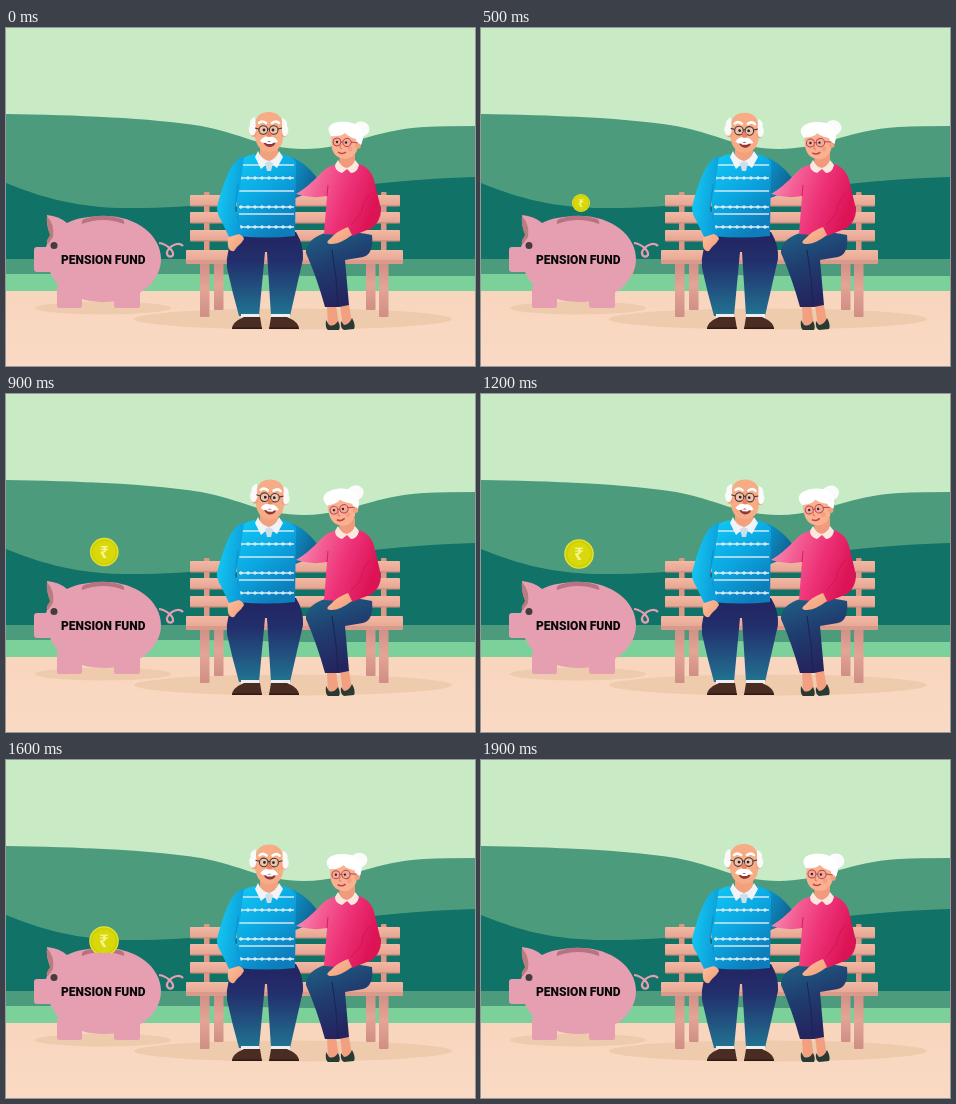
These frames come from a looping animation (469 by 338 pixels, 2 s). An HTML page:

```html
<!DOCTYPE html>
<html lang="en">
<head>
<meta charset="utf-8">
<title>Pension fund</title>
<style>
html, body { margin: 0; width: 100%; height: 100%; overflow: hidden; background: #c8ebc6; }
svg { display: block; width: 100vw; height: 100vh; }
</style>
</head>
<body>
<svg viewBox="0 0 469 338" preserveAspectRatio="none">
  <defs>
    <linearGradient id="ground" x2="0" y2="1"><stop stop-color="#f8d5bd"/><stop offset="1" stop-color="#fadac4"/></linearGradient>
    <linearGradient id="wood" x2="0" y2="1"><stop stop-color="#f2b9a3"/><stop offset="1" stop-color="#e5a492"/></linearGradient>
    <linearGradient id="leg" x2="0" y2="1"><stop stop-color="#cf8c84"/><stop offset=".5" stop-color="#e3a596"/><stop offset="1" stop-color="#d08e85"/></linearGradient>
    <linearGradient id="blue" x2=".6" y2="1"><stop stop-color="#10caf6"/><stop offset=".5" stop-color="#0ba9e3"/><stop offset="1" stop-color="#0d7dbb"/></linearGradient>
    <linearGradient id="sleeve" x2="1" y2=".4"><stop stop-color="#16d0f8"/><stop offset="1" stop-color="#0c9cd8"/></linearGradient>
    <linearGradient id="backArm" x2="1" y2=".6"><stop stop-color="#0aa2df"/><stop offset="1" stop-color="#125f8c"/></linearGradient>
    <linearGradient id="denim" x2="0" y2="1"><stop stop-color="#232460"/><stop offset=".35" stop-color="#222f6c"/><stop offset="1" stop-color="#217492"/></linearGradient>
    <linearGradient id="slacks" x2=".3" y2="1"><stop stop-color="#1e6285"/><stop offset=".5" stop-color="#203d70"/><stop offset="1" stop-color="#24245f"/></linearGradient>
    <linearGradient id="pink" x2="1" y2=".3"><stop stop-color="#f79abb"/><stop offset=".35" stop-color="#f35c93"/><stop offset=".65" stop-color="#ee3278"/><stop offset="1" stop-color="#dc1456"/></linearGradient>
    <linearGradient id="skin" x2="1" y2="1"><stop stop-color="#fbc09c"/><stop offset="1" stop-color="#f39c7a"/></linearGradient>
    <clipPath id="aboveSlot"><path d="M60 130H140V197H118Q97 188 76 197H60Z"/></clipPath>
    <clipPath id="sweaterClip"><path d="M233 129H288V209H233Z"/></clipPath>
  </defs>

  <!-- landscape -->
  <path fill="#c8ebc6" d="M0 0H469V338H0Z"/>
  <path fill="#4d9b7d" d="M0 86C70 87 145 90 195 98C234 105 258 121 298 121C342 121 366 102 418 99Q440 98 469 98V250H0Z"/>
  <path fill="#117267" d="M0 155C30 167 65 179 115 180C185 181 240 172 300 165Q390 151 469 149V231H0Z"/>
  <path fill="#4d9b7d" d="M0 231H469V250H0Z"/>
  <path fill="#7cd19b" d="M0 246H200L300 248H469V264H0Z"/>
  <path fill="url(#ground)" d="M0 263H469V338H0Z"/>
  <g fill="#eecbad">
    <ellipse cx="97" cy="280" rx="68" ry="6.5"/>
    <ellipse cx="287" cy="291" rx="159" ry="10.5"/>
  </g>

  <!-- piggy bank -->
  <g fill="#e69fb1">
    <path d="M153 215C161 216 168 223 167 227C164 231 159 227 162 222C166 216 174 214 177 218" fill="none" stroke="#e69fb1" stroke-width="2.2"/>
    <path d="M51 258H76V278Q76 280 74 280H53Q51 280 51 278ZM108 258H134V278Q134 280 132 280H110Q108 280 108 278Z"/>
    <path d="M41 187Q53 188 61 195C71 190 83 188 99 188C130 188 155 207 155 231C155 255 130 274 99 274C72 274 53 264 44 244H31Q28 244 28 241V222Q28 219 31 219H40Q42 212 45 208Q40 198 41 187Z"/>
    <path fill="#b97d7f" d="M41 188Q49 197 47 209L42 216Q40 216 41 212L44 207Q40 197 41 188Z"/>
    <circle cx="48" cy="217.5" r="3.5" fill="#453c40"/>
    <path fill="#b77382" d="M76 196Q75 193 78 191Q97 184 116 191Q119 193 118 196Q97 188 76 196Z"/>
  </g>
  <text x="55" y="236" font-family="Roboto, Arial, sans-serif" font-size="12" font-weight="900" fill="#090909">PENSION FUND</text>
  <g clip-path="url(#aboveSlot)">
    <g id="coin">
      <circle r="14.5" fill="#e4e332"/>
      <circle r="13.2" fill="#d0cf05"/>
      <circle r="11.3" fill="#d9d80c"/>
      <text y="6" text-anchor="middle" font-family="'Noto Sans', 'DejaVu Sans', sans-serif" font-size="17" font-weight="600" fill="#f6f58d">₹</text>
    </g>
  </g>

  <!-- bench -->
  <g id="bench"></g>

  <!-- man -->
  <path fill="url(#backArm)" d="M280 128Q297 131 312 151L302 165L287 171Z"/>
  <path fill="url(#denim)" d="M231 204H290Q298 217 297 231L284 288H265L261 224H259L253 288H233Q226 263 221 240Q219 222 231 204Z"/>
  <path fill="#eee" d="M235 286H253V290H235ZM265 286H284V290H265Z"/>
  <path fill="#4b2c22" d="M238 289H254L256 301H226Q226 294 238 289ZM265 289H281Q293 294 293 301H263Z"/>
  <path fill="#2d1b17" d="M226 299.5H256V301H226ZM263 299.5H293V301H263Z"/>
  <path fill="url(#blue)" d="M248 126Q260 132 276 126Q286 128 290 134L289 208Q261 211 231 208V137Q237 128 248 126Z"/>
  <g id="knit" clip-path="url(#sweaterClip)" fill="none" stroke="#cfe9f6"></g>
  <path fill="url(#skin)" d="M224 204Q238 206 238 211Q236 215 231 219L228 223Q223 224 222 218Q221 212 224 204Z"/>
  <path fill="url(#sleeve)" d="M238 128C225 132 219 151 212 175Q209 183 215 192L223 209L236 205L229 181L234 160Z"/>
  <path d="M232 156L229 181L233 193" fill="none" stroke="#0a8cc8" stroke-width=".8"/>
  <path fill="#f1a17d" d="M254 115H272V128Q263 139 254 128Z"/>
  <path fill="#f0f3f8" d="M252 123Q255 131 263 133Q270 131 273 123L277 129L271 140L263 134L255 141L249 129Z"/>
  <path fill="#cfdfea" d="M259 135L263 133L267 135L265 143H261Z"/>
  <g id="manHead">
    <path fill="#f8ac85" d="M249 98C249 88 255 84 263 84C271 84 277 89 277 99V110Q276 123 263 124Q251 123 249 109Z"/>
    <circle cx="248" cy="106" r="3" fill="#f3a07d"/><circle cx="278" cy="106" r="3" fill="#f3a07d"/>
    <path fill="#fafafa" d="M249 89Q243 91 244 97Q241 102 245 107Q249 109 250 102ZM276 90Q282 92 281 98Q284 103 280 108Q276 109 276 102Z"/>
    <path d="M253 95Q256 92 260 95M266 95Q270 92 273 95" fill="none" stroke="#fff" stroke-width="2.6" stroke-linecap="round"/>
    <g fill="#efc4ae" stroke="#4a3435" stroke-width="1.1"><circle cx="257.3" cy="102" r="4.3"/><circle cx="267.7" cy="102" r="4.3"/><path d="M253 101L249 100M272 101L276 100M261.5 101H263.5"/></g>
    <circle cx="258" cy="102" r="1.4" fill="#2c2226"/><circle cx="267" cy="102" r="1.4" fill="#2c2226"/>
    <path fill="#ec815f" d="M261 104Q263 102 265 105Q267 109 263 109.500Q259 109 261 104Z"/>
    <path fill="#91353a" d="M257 113H270Q269 119 263 119Q258 118 257 113Z"/>
    <path fill="#fff" d="M263 109Q269 108 272 114Q267 116 263 113Q258 117 254 113Q258 107 263 109Z"/>
    <path fill="#fff" d="M259 114H268L266 116H261Z"/>
  </g>

  <!-- woman -->
  <path fill="#f2a080" d="M321 277H330L333 297L322 300ZM334 277H343L346 295L337 299Z"/>
  <path fill="#293a35" d="M320 292L323 297Q328 299 332 293Q335 299 333 302H322Q319 300 320 292ZM335 293L338 297Q343 297 346 290Q350 297 348 301L338 302Q334 300 335 293Z"/>
  <path fill="url(#slacks)" d="M319 205Q345 202 366 207Q368 226 357 229L339 232L343 277L333 279H319Q311 250 300 225Q299 212 319 205Z"/>
  <path d="M326 222Q331 250 332 279" fill="none" stroke="#1b2254"/>
  <path fill="url(#pink)" d="M331 136Q341 143 353 136Q366 140 369 156L375 181Q375 193 366 200L346 208L318 206L321 168Q306 171 290 166Q302 159 314 146Q321 138 331 136Z"/>
  <path d="M321 168L322 157M365 165Q354 178 356 184L345 197" fill="none" stroke="#cc1454" stroke-width=".8"/>
  <path fill="url(#skin)" d="M342 199L346 207Q333 217 324 216Q318 215 325 210Q331 203 342 199Z"/>
  <path fill="#ef9b7c" d="M334 124H349V136Q341 145 333 136Z"/>
  <path fill="#fbe9e0" d="M332 132Q335 139 341 140Q347 138 349 132L353 137Q351 145 345 145L341 141L336 145Q329 143 329 137Z"/>
  <g id="womanHead">
    <ellipse cx="355" cy="101" rx="8.500" ry="7.500" fill="#fbfbfb"/>
    <path fill="#f4f4f4" d="M326 108C320 96 332 91 344 95C357 96 360 109 354 118L346 121Z"/>
    <path fill="#f9b18f" d="M326 106Q338 98 351 110Q354 121 348 127Q341 134 332 129Q323 124 326 106Z"/>
    <path fill="#fff" d="M325 108Q319 99 328 95Q343 91 354 99Q360 105 355 117Q351 118 350 111Q343 109 339 105Q334 109 325 108Z"/>
    <circle cx="352" cy="118" r="2.800" fill="#f2a07e"/>
    <g fill="#f0ab98" stroke="#ba4252" stroke-width="1"><circle cx="331" cy="114" r="4"/><circle cx="341" cy="114.500" r="4.200"/><path d="M345 114L352 115M335 114H337"/></g>
    <circle cx="331" cy="114" r="1.200" fill="#392528"/><circle cx="340" cy="114.500" r="1.200" fill="#392528"/>
    <path d="M335 116L334 120L336 121" fill="none" stroke="#e4795d"/>
    <path d="M332 124Q336 127 340 124" fill="none" stroke="#c63e49" stroke-width="1.500"/>
    <circle cx="344" cy="121" r="2.400" fill="#f48c79" opacity=".5"/>
  </g>
</svg>
<script>
const byId = id => document.getElementById(id);
const rect = (x, y, w, h, fill) =>
  `<rect x="${x}" y="${y}" width="${w}" height="${h}" rx="1" fill="${fill}"/>`;

function buildBench() {
  let parts = '';
  for (const [x, y, h] of [[194, 232, 57], [208, 232, 50], [360, 232, 50], [373, 232, 57]])
    parts += rect(x, y, 9.5, h, 'url(#leg)');
  for (const x of [198, 375]) parts += rect(x, 164, 5.5, 59, '#dc9988');
  for (const y of [167, 184, 202]) {
    parts += rect(184, y, 210, 11, 'url(#wood)');
    parts += rect(184, y + 10, 210, 1.5, '#d39384');
  }
  parts += rect(180, 222, 217, 13, 'url(#wood)') + rect(180, 232, 217, 4, '#d89a8b');
  byId('bench').innerHTML = parts;
}

function buildKnit() {
  let parts = '';
  for (const y of [137, 163, 186])
    parts += `<path d="M232 ${y}H290" stroke-width="1.3"/>`;
  for (const y of [150, 179, 199]) {
    parts += `<path d="M232 ${y}H290" stroke-width="1.6"/>`;
    for (let x = 235; x < 290; x += 7)
      parts += `<path d="M${x - 2.5} ${y}l2.5-2 2.5 2-2.5 2Z" fill="#cfe9f6" stroke="none"/>`;
  }
  byId('knit').innerHTML = parts;
}

// time, x, y, radius
const coinSteps = [
  [300, 100, 188, 0], [400, 100, 182, 5], [500, 100, 175, 9],
  [700, 99, 163, 13], [900, 98.3, 158, 14.3], [1200, 98, 160, 14.8],
  [1300, 98, 162, 14.8], [1400, 98, 166, 14.8], [1500, 98, 172.5, 14.8],
  [1600, 98, 181, 14.8], [1700, 98, 193, 14.8], [1800, 98, 206, 14.8], [1900, 98, 222, 0]
];

function coinAt(t) {
  const next = coinSteps.findIndex(step => step[0] > t);
  if (next < 1) return [100, 188, 0];
  const a = coinSteps[next - 1], b = coinSteps[next];
  const k = (t - a[0]) / (b[0] - a[0]);
  return [1, 2, 3].map(i => a[i] + (b[i] - a[i]) * k);
}

function draw(t) {
  const sway = (1 - Math.cos(t / 1000 * Math.PI)) / 2;
  byId('manHead').setAttribute('transform', `translate(0 ${1.5 * sway}) rotate(${3 * sway} 263 127)`);
  byId('womanHead').setAttribute('transform', `rotate(${-11 * sway} 341 131)`);
  const [x, y, r] = coinAt(t);
  byId('coin').setAttribute('transform', `translate(${x} ${y}) scale(${r / 14.5})`);
}

buildBench();
buildKnit();
const start = performance.now();
function tick() {
  const elapsed = (performance.now() - start) % 2000;
  draw(Math.floor(elapsed / 100) * 100);
  requestAnimationFrame(tick);
}
tick();
</script>
</body>
</html>
```
